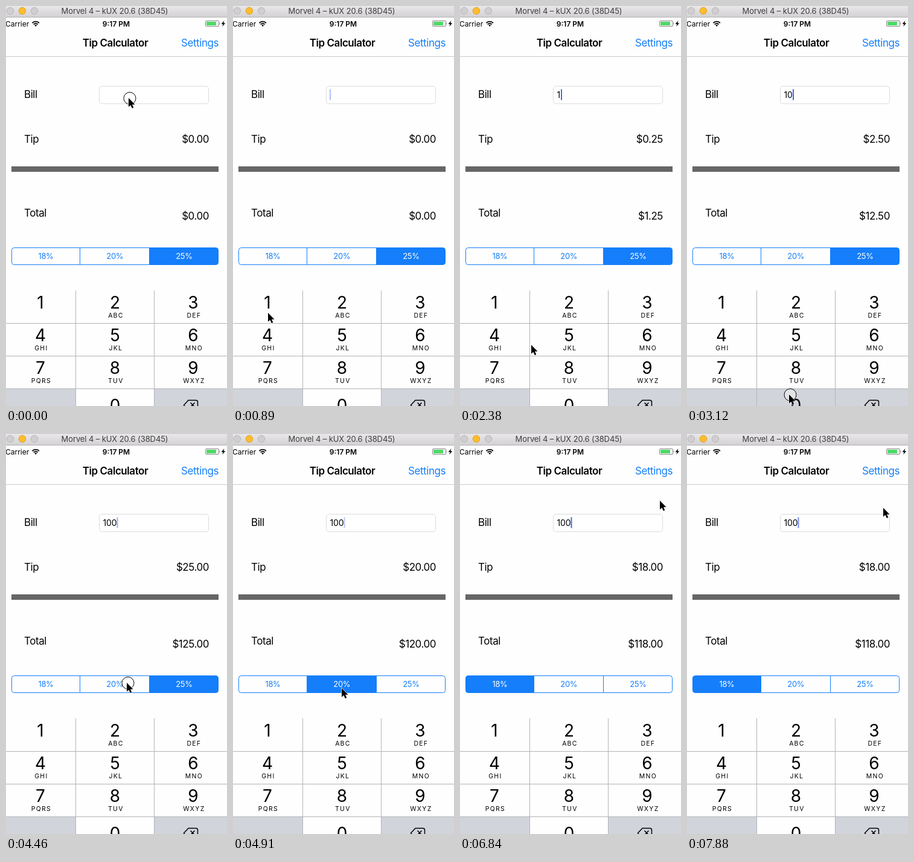
Recreate the animation shown at these times as an HTML page. Size 366x661 px, loop 8 s.

```html
<!DOCTYPE html>
<html lang="en">
<head>
<meta charset="utf-8">
<title>Tip Calculator</title>
<style>
  html, body { margin: 0; width: 100%; height: 100%; overflow: hidden; background: #fefefe; }
  svg { display: block; width: 100%; height: 100%; }
  text { font-family: Inter, Roboto, sans-serif; font-size: 17px; letter-spacing: -.45px; }
  .status { font-size: 12px; letter-spacing: 0; }
  .mid { text-anchor: middle; }
  .end { text-anchor: end; }
  .bold { font-weight: 600; }
  .digit { font-size: 28px; letter-spacing: 0; }
  .letters { font-size: 10.5px; letter-spacing: 1.25px; }
  .segment { font-size: 13px; letter-spacing: -.3px; }
  .line { fill: none; stroke: #b4b4b8; }
</style>
</head>
<body>
<svg viewBox="0 0 366 661" preserveAspectRatio="none">
  <defs>
    <linearGradient id="chrome" x2="0" y2="1">
      <stop stop-color="#e9e7e9"/><stop offset="1" stop-color="#d3d1d3"/>
    </linearGradient>
  </defs>
  <rect width="366" height="661" fill="#fefefe"/>

  <rect width="366" height="18" fill="url(#chrome)"/>
  <path d="M0 18.5H366" stroke="#b5b3b5"/>
  <circle cx="7" cy="8" r="5.7" fill="#d0ced0" stroke="#b9b7b9"/>
  <circle cx="27" cy="8" r="5.7" fill="#fdbd2e" stroke="#dfa023"/>
  <circle cx="47" cy="8" r="5.7" fill="#d0ced0" stroke="#b9b7b9"/>
  <text class="mid" x="180" y="13" fill="#3e3e3e" style="font-size:13px;letter-spacing:-.1px">Morvel 4 – kUX 20.6 (38D45)</text>

  <text class="status" x="-1" y="33.5">Carrier</text>
  <g fill="none" stroke="#000" stroke-width="1.8">
    <path d="M43.5 28a8 8 0 0 1 11.4 0M45.7 30.4a5 5 0 0 1 7 0"/>
    <path d="M49.2 34l-2-2.2a3 3 0 0 1 4 0z" fill="#000" stroke="none"/>
  </g>
  <text class="status bold mid" x="182.5" y="33.5">9:17 PM</text>
  <rect x="330.5" y="24.5" width="22" height="9" rx="1.5" fill="#fff" stroke="#858585"/>
  <rect x="332" y="26" width="16" height="6" fill="#4cd964"/>
  <path d="M353.5 27.5q2 1.5 0 3z" fill="#858585"/>
  <path d="M361.5 24l-5 5.7h3l-1.3 4.3 5-5.8h-3z"/>

  <text class="bold mid" x="181" y="67">Tip Calculator</text>
  <text class="end" x="352" y="67" fill="#157efb">Settings</text>
  <path d="M0 83.5H366" stroke="#cbcbcb"/>

  <text x="30" y="151.5">Bill</text>
  <text x="30" y="225.5">Tip</text>
  <text x="30" y="347.5">Total</text>
  <rect x="154.5" y="132.5" width="181" height="29" rx="4.5" fill="#fff" stroke="#dcdcdc"/>
  <text id="bill" x="160.5" y="151.5" style="font-size:14px;letter-spacing:-.1px"></text>
  <rect id="caret" y="137.5" width="2" height="18" fill="#426bf2"/>
  <text id="tip" class="end" x="336" y="225.5"></text>
  <text id="total" class="end" x="336" y="352.5"></text>
  <rect x="9" y="265" width="343" height="9" fill="#666"/>

  <g id="segments"></g>
  <g id="keypad"></g>

  <circle id="touch" r="10" fill="#fff" fill-opacity=".35" stroke="#000"/>
  <path id="cursor" d="M0 0V14.8L3.4 11.7L5.8 17L8.3 16L6 10.8H10.5Z" stroke="#fff" stroke-width="1.2" paint-order="stroke"/>
</svg>
<script>
const LOOP = 8000, TICK = 148.3, BLUE = '#157efb', KEY_GREY = '#d1d4db';
const $ = id => document.getElementById(id);

function add(parent, tag, attrs, text = '') {
  const node = document.createElementNS(parent.namespaceURI, tag);
  for (const name in attrs) node.setAttribute(name, attrs[name]);
  node.textContent = text;
  return parent.appendChild(node);
}

// Segmented control
const edges = [9.5, 122.5, 237.5, 351.5];
const segments = ['18%', '20%', '25%'].map((label, i) => {
  const a = edges[i], b = edges[i + 1];
  const d = [
    `M${b} 399.5H${a + 4}q-4 0 -4 4v20q0 4 4 4H${b}z`,
    `M${a} 399.5H${b}v28H${a}z`,
    `M${a} 399.5H${b - 4}q4 0 4 4v20q0 4 -4 4H${a}z`
  ][i];
  return {
    shape: add($('segments'), 'path', { d, stroke: BLUE }),
    label: add($('segments'), 'text', { class: 'segment mid', x: [66, 180.3, 295][i], y: 418 }, label)
  };
});

// Keypad
const pad = $('keypad'), columns = [57, 180.5, 310];
const columnEdges = [0, 115, 245, 366];
const keyRect = (col, row, fill) => add(pad, 'rect', {
  x: columnEdges[col], y: 470 + 54 * row, width: columnEdges[col + 1] - columnEdges[col], height: 54, fill
});
const oneKey = keyRect(0, 0, '#fefefe');
const zeroKey = keyRect(1, 3, '#fefefe');
keyRect(0, 3, KEY_GREY);
keyRect(2, 3, KEY_GREY);
add(pad, 'path', { class: 'line', d: 'M115.5 470V661M245.5 470V661M0 524.5H366M0 578.5H366M0 632.5H366' });
['', 'ABC', 'DEF', 'GHI', 'JKL', 'MNO', 'PQRS', 'TUV', 'WXYZ'].forEach((letters, i) => {
  const x = columns[i % 3], y = 500 + 54 * Math.floor(i / 3);
  add(pad, 'text', { class: 'digit mid', x, y }, i + 1);
  add(pad, 'text', { class: 'letters mid', x: x + 1.4, y: y + 15 }, letters);
});
add(pad, 'text', { class: 'digit mid', x: columns[1], y: 670 }, '0');
add(pad, 'path', {
  d: 'M302 651.5h12.5a3 3 0 0 1 3 3v10a3 3 0 0 1-3 3h-12.500l-7.500-8zM305.500 655.500l7 7m0-7l-7 7',
  fill: 'none', stroke: '#000', 'stroke-width': 1.5
});

// Pointer waypoints: tick, x, y
const path = [
  [0, 203, 152], [1, 207, 153], [2, 212, 160], [3, 195, 230], [5, 85, 450], [6, 58, 507], [7, 57, 510],
  [8, 57, 510], [9, 60, 505], [13, 67, 488], [14, 67, 488], [15, 78, 505], [16, 118, 560], [17, 148, 615],
  [18, 164, 638], [21, 169, 642], [25, 169, 642], [27, 180, 555], [29, 198, 425], [30, 200, 411],
  [32, 200, 411], [33, 180, 420], [36, 74, 430], [37, 70, 424], [38, 70, 424], [39, 71, 419], [40, 71, 419],
  [42, 130, 340], [45, 315, 130], [46, 331, 110], [47, 318, 190], [48, 245, 325], [49, 184, 397],
  [50, 215, 330], [51, 285, 180], [52, 337, 82], [53, 325, 122]
];
function pointerAt(tick) {
  const next = path.findIndex(p => p[0] > tick);
  if (next < 0) return path[path.length - 1].slice(1);
  const [t0, x0, y0] = path[next - 1], [t1, x1, y1] = path[next];
  const f = (tick - t0) / (t1 - t0);
  return [x0 + (x1 - x0) * f, y0 + (y1 - y0) * f];
}

const clamp = v => Math.max(0, Math.min(1, v));
function caretOpacity(ms, tick) {
  if (ms < 300) return 0;
  if (tick >= 14 && tick < 28) return 1;
  const phase = ms % 1000 / 1000;
  return Math.min(clamp((phase - .4) / .12), clamp((.94 - phase) / .09));
}

function render(ms) {
  const tick = Math.floor(ms / TICK);
  const bill = tick < 14 ? '' : tick < 21 ? '1' : tick < 24 ? '10' : '100';
  const rate = tick < 31 ? .25 : tick < 39 ? .2 : .18;
  const selected = tick < 32 ? 2 : tick < 40 ? 1 : 0;
  const pressed = tick === 31 ? 1 : tick === 39 ? 0 : -1;
  const zeroDown = [21, 22, 24].includes(tick);

  $('bill').textContent = bill;
  $('tip').textContent = '$' + (bill * rate).toFixed(2);
  $('total').textContent = '$' + (bill * (1 + rate)).toFixed(2);
  $('caret').setAttribute('x', [160, 167, 175, 183.5][bill.length]);
  $('caret').setAttribute('opacity', caretOpacity(tick * TICK + 12, tick));

  segments.forEach(({ shape, label }, i) => {
    shape.setAttribute('fill', i === selected ? BLUE : i === pressed ? '#d3e7fe' : '#fefefe');
    label.setAttribute('fill', i === selected ? '#fff' : i === pressed ? '#589fee' : BLUE);
  });
  oneKey.setAttribute('fill', tick === 14 ? KEY_GREY : '#fefefe');
  zeroKey.setAttribute('fill', zeroDown ? KEY_GREY : '#fefefe');

  const [x, y] = pointerAt(tick);
  const touching = zeroDown || [0, 14, 30, 39].includes(tick);
  $('cursor').setAttribute('transform', `translate(${x} ${y})`);
  $('touch').setAttribute('transform', `translate(${x + 2} ${y + .5})`);
  $('touch').setAttribute('visibility', touching ? 'visible' : 'hidden');
}

const start = performance.now();
function loop() {
  render((performance.now() - start) % LOOP);
  requestAnimationFrame(loop);
}
loop();
</script>
</body>
</html>
```
